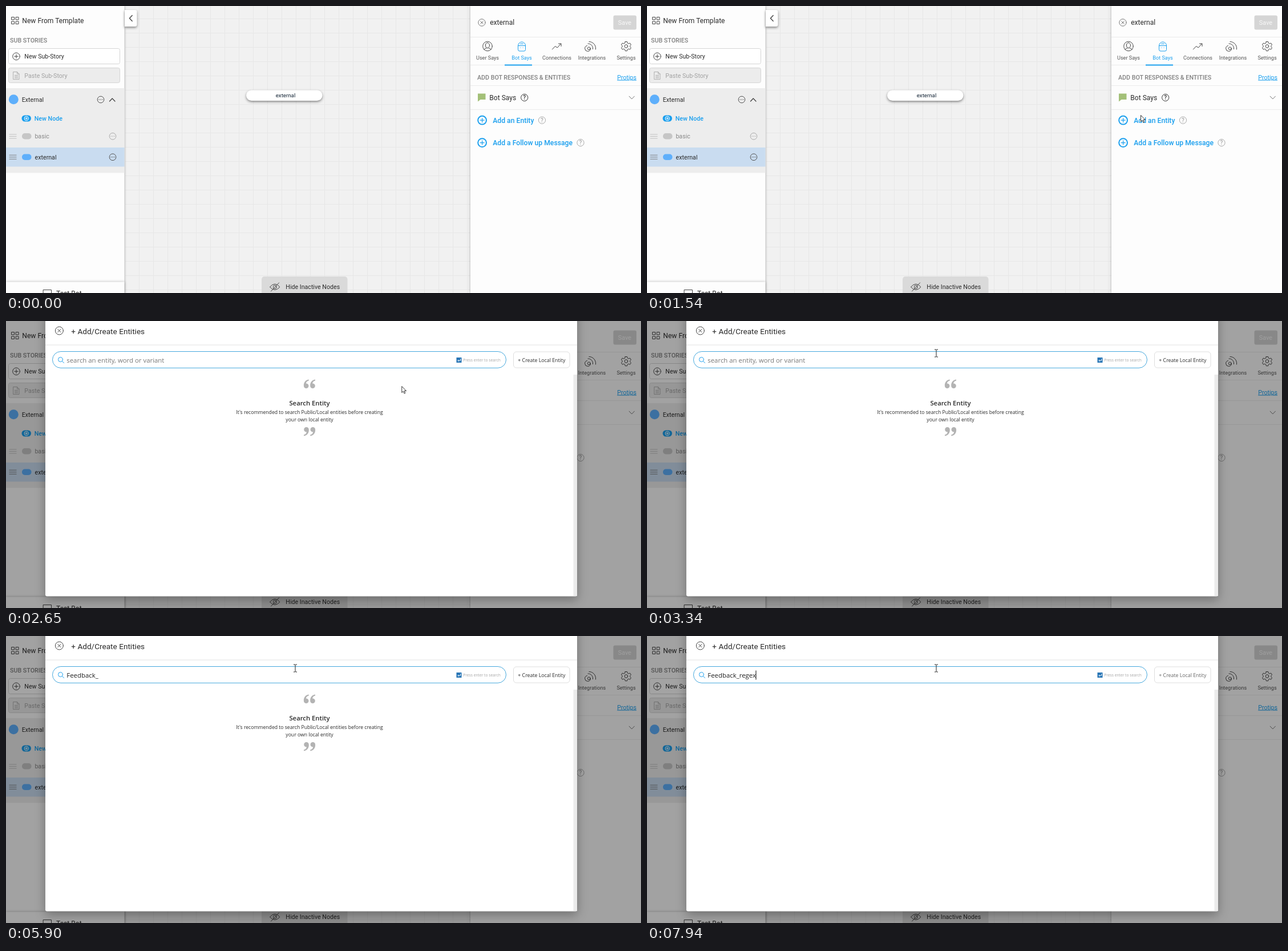
Animation of 1113 by 503 pixels, one loop 8000 ms. Source, as an HTML page:

```html
<!DOCTYPE html>
<html lang="en">
<head>
<meta charset="utf-8">
<title>Entity search</title>
<style>
html, body { margin: 0; width: 100%; height: 100%; overflow: hidden; background: #f1f1f1; }
svg { display: block; }
text { font: 10.65px Roboto, sans-serif; fill: #2b2b2b; white-space: pre; }
.big { font-size: 12.1px; }
.tab { font-size: 9.1px; fill: #555; }
.head { font-size: 10.7px; font-weight: 500; fill: #808080; }
.med { font-weight: 500; }
.blue { fill: #1a9fee; }
.pale { fill: #a2a2a2; }
.mid { text-anchor: middle; }
.os { font-family: "Open Sans", sans-serif; font-size: 8.65px; }
.ln { fill: none; stroke: #444; stroke-width: 1; stroke-linecap: round; stroke-linejoin: round; }
.ln.gray { stroke: #b0b0b0; }
.ln.azure { stroke: #1a9fee; }
.panel { filter: drop-shadow(0 0 2px rgba(0,0,0,.3)); }
.lift { filter: drop-shadow(0 2px 2px rgba(0,0,0,.45)); }
.dialog { filter: drop-shadow(0 6px 9px rgba(0,0,0,.3)); }
</style>
</head>
<body>
<svg width="1113" height="503" viewBox="0 0 1113 503">
<defs>
  <pattern id="grid" x="208" y="22" width="25" height="25" patternUnits="userSpaceOnUse">
    <path d="M0 .5H25M.5 0V25" stroke="#e7e7e7" fill="none"/>
  </pattern>
  <g id="dots">
    <circle r="5.8" fill="none" stroke="currentColor"/>
    <path d="M-2.9 0h.1M0 0h.1M2.9 0h.1" stroke="currentColor" stroke-width="1.4" stroke-linecap="round"/>
  </g>
  <g id="help">
    <circle r="6.1" fill="none" stroke="currentColor"/>
    <text class="mid med" y="3.6" style="font-size:10px;fill:currentColor">?</text>
  </g>
  <g id="plus">
    <circle r="7.4" fill="none" stroke="#1a9fee" stroke-width="2"/>
    <path d="M-4 0H4M0-4V4" stroke="#1a9fee" stroke-width="1.2"/>
  </g>
  <path id="grip" d="M0-3.5H13M0 0H13M0 3.5H13" fill="none" stroke="currentColor" stroke-width=".9"/>
  <g id="quote" fill="#b3b3b3">
    <path id="mark" d="M9.2-7.5V-5.6C6.4-4.9 4.6-3 4.3-.6A4.3 4.3 0 1 1 .4 3.5C0-2.200 3.400-6.600 9.2-7.5Z"/>
    <use href="#mark" x="11.3"/>
  </g>
</defs>

<!-- Canvas -->
<rect width="1113" height="503" fill="#f1f1f1"/>
<rect x="208" width="606" height="503" fill="url(#grid)"/>
<rect class="lift" x="421" y="147.500" width="133.500" height="18.500" rx="9.250" fill="#fff"/>
<text class="mid" x="490" y="160.300" style="font-size:9.700px;fill:#123">external</text>
<path d="M448 503V479a5 5 0 0 1 5-5H593.500a5 5 0 0 1 5 5V503Z" fill="#dadada"/>
<g class="ln" stroke-width="1.200">
  <path d="M462.500 492.500q8.700-10.500 17.500 0q-8.800 10-17.500 0M464.500 500L478.500 485"/>
  <circle cx="471.300" cy="492.500" r="3"/>
</g>
<text x="490.300" y="496.300">Hide Inactive Nodes</text>

<!-- Sidebar -->
<rect class="panel" width="207.500" height="503" fill="#fdfdfd"/>
<g class="lift">
  <path d="M208 7H226a3.500 3.500 0 0 1 3.500 3.500V32.500a3.500 3.500 0 0 1-3.500 3.500H208Z" fill="#fff"/>
</g>
<path class="ln" d="M221.200 16.500L216.500 21.500L221.200 26.500" style="stroke-width:1.400"/>
<path class="ln" d="M10 19.500h4.500v4.500h-4.500zM17.500 19.500h4.500v4.500h-4.500zM10 27h4.500v4.500h-4.500zM17.500 27h4.500v4.500h-4.500z"/>
<text class="big" x="28.300" y="30">New From Template</text>
<text class="head" x="7" y="64.200">SUB STORIES</text>
<rect x="4.500" y="74.500" width="195" height="27" rx="3" fill="#fff" stroke="#d5d5d5"/>
<circle class="ln" cx="18" cy="88.300" r="6.300"/>
<path class="ln" d="M14.800 88.300h6.400M18 85.100v6.400"/>
<text x="32.300" y="92.200">New Sub-Story</text>
<rect x="4.500" y="108.500" width="195" height="26" rx="3" fill="#ececec" stroke="#d5d5d5"/>
<path class="ln gray" d="M13 115.500h6.500l3.500 3.500v9.500h-10zM19.500 115.500v3.500h3.500M15.300 121.500h5.400M15.300 123.800h5.400M15.300 126h5.400"/>
<text class="pale" x="32.300" y="125.500">Paste Sub-Story</text>
<rect y="144" width="207.500" height="148.500" fill="#ededed"/>
<rect y="248" width="207.500" height="33.500" fill="#c9dcf0"/>
<circle cx="13.300" cy="163.800" r="8.500" fill="#5eaffb"/>
<text x="27.800" y="167.800">External</text>
<use href="#dots" x="166" y="164" color="#555"/>
<path class="ln" d="M181.500 167L186.200 162L191 167" style="stroke-width:1.300"/>
<rect x="27.500" y="191.500" width="16.500" height="11" rx="5.500" fill="#1a9fee"/>
<circle cx="35.700" cy="197" r="3.700" fill="none" stroke="#fff"/>
<path d="M33.500 197h4.400M35.700 194.800v4.400" stroke="#fff"/>
<text class="med blue" x="49.800" y="200.800">New Node</text>
<use href="#grip" x="5.500" y="228.500" color="#bbb"/>
<rect x="28" y="223" width="16.500" height="10.500" rx="5" fill="#c6c6c6"/>
<text x="50.400" y="232.200" style="fill:#888">basic</text>
<use href="#dots" x="187" y="228.300" color="#aaa"/>
<use href="#grip" x="5.500" y="264.800" color="#777"/>
<rect x="28" y="259.500" width="16.500" height="10.500" rx="5" fill="#5eaffb"/>
<text x="50.600" y="268.500">external</text>
<use href="#dots" x="187" y="264.800" color="#555"/>
<rect class="panel" y="483.500" width="207.500" height="30" fill="#fdfdfd"/>
<rect class="ln" x="65.500" y="497.500" width="14" height="12"/>
<text class="big" x="88" y="507.800">Test Bot</text>

<!-- Right panel -->
<rect class="panel" x="814" width="310" height="503" fill="#fdfdfd"/>
<circle class="ln" cx="834" cy="29" r="6.200" style="stroke:#777"/>
<path class="ln" d="M831.700 26.700l4.600 4.600M836.300 26.700l-4.600 4.600" style="stroke:#777"/>
<text class="big" x="848.200" y="33.300">external</text>
<rect x="1064.500" y="16.500" width="40.500" height="25" rx="3" fill="#d5d5d5"/>
<text class="mid" x="1084.500" y="33" style="font-size:10.900px;fill:#f8f8f8">Save</text>
<path d="M814 54.500H1113M814 103.500H1113M814 139.500H1113M814 181.500H1113" stroke="#ebebeb"/>
<rect x="874" y="102.500" width="48" height="2" fill="#1a9fee"/>
<g class="ln">
  <circle cx="844" cy="70.500" r="8.300"/>
  <ellipse cx="844" cy="69" rx="3.500" ry="4.600"/>
  <path d="M838 76.300q1-2 4-2.600M850 76.300q-1-2-4-2.600M957.500 76l5-5.500l4 2.500l6-7M968.500 66h4.500v4.500"/>
  <path d="M1018.500 69.500a5 5 0 1 0 6 6M1020 66a8 8 0 0 1 8.500 9.500M1022 62.500a11.500 11.500 0 0 1 11.500 13.500"/>
  <circle cx="1021.800" cy="74.300" r="2.400"/>
  <circle cx="1087" cy="70.500" r="2.800"/>
  <path d="M1085.300 62.500h3.400l.6 2.500l2 1l2.300-1l2 3l-1.800 1.700v1.800l1.800 1.700l-2 3l-2.300-1l-2 1l-.6 2.500h-3.400l-.6-2.500l-2-1l-2.300 1l-2-3l1.800-1.700v-1.800l-1.800-1.700l2-3l2.300 1l2-1z"/>
</g>
<path class="ln azure" d="M897.500 69.500a6.500 6.500 0 0 1 13 0v7q0 2.500-2.500 2.500h-8q-2.500 0-2.500-2.500zM897.500 69.500h13M902 73h.1M906 73h.1M901.500 66.300h5"/>
<g class="mid">
  <text class="tab" x="844" y="94.200">User Says</text>
  <text class="tab blue" x="904" y="94.200" style="fill:#1a9fee">Bot Says</text>
  <text class="tab" x="965.500" y="94.200">Connections</text>
  <text class="tab" x="1027" y="94.200">Integrations</text>
  <text class="tab" x="1087" y="94.200">Settings</text>
</g>
<text class="head" x="826" y="128.800">ADD BOT RESPONSES &amp; ENTITIES</text>
<text class="blue" x="1071.200" y="128.500" text-decoration="underline">Protips</text>
<path d="M827 153.500h13.500v10.500h-9l-4.500 3.500z" fill="#a3c078"/>
<text class="big" x="847.300" y="165">Bot Says</text>
<use href="#help" x="908.700" y="160.500" color="#333"/>
<path class="ln" d="M1092.200 158.200L1096.800 163L1101.400 158.200" style="stroke:#777"/>
<use href="#plus" x="834.600" y="200.200"/>
<text class="med blue" x="853.200" y="204.800" style="font-size:12.200px">Add an Entity</text>
<use href="#help" x="939.500" y="200.200" color="#a8a8a8"/>
<use href="#plus" x="834.600" y="239.600"/>
<text class="med blue" x="853.200" y="244.200" style="font-size:12.200px">Add a Follow up Message</text>
<use href="#help" x="1007" y="239.600" color="#a8a8a8"/>

<!-- Dialog -->
<g id="modal" visibility="hidden">
  <rect width="1113" height="503" fill="#000" opacity=".36"/>
  <rect class="dialog" x="69" y="-20" width="932" height="502.500" rx="3" fill="#fff"/>
  <path d="M69 42H1001" stroke="#e2e2e2"/>
  <rect x="994.500" y="94" width="6.500" height="388" fill="#ebebeb"/>
  <circle class="ln" cx="93.400" cy="17" r="7"/>
  <path class="ln" d="M90.800 14.400l5.200 5.200M96 14.400l-5.200 5.200"/>
  <text x="114.300" y="23" style="font-size:13.600px">+ Add/Create Entities</text>
  <rect x="81.500" y="53.500" width="795" height="28.800" rx="14.400" fill="#fff" stroke="#45a8dd"/>
  <circle class="ln azure" cx="95.500" cy="67.500" r="4"/>
  <path class="ln azure" d="M98.500 70.500l3 3"/>
  <text id="field" class="os" x="106.300" y="72.800" style="font-size:11.400px"></text>
  <rect id="caret" y="60.500" width="1" height="16" fill="#000"/>
  <rect x="789.500" y="64" width="9" height="9" fill="#2674b5"/>
  <path d="M796.500 66v3.500h-4.500M793.500 68l-1.700 1.500l1.700 1.500" fill="none" stroke="#fff" stroke-width=".9"/>
  <text class="os" x="801.200" y="71" style="font-size:6.700px;fill:#a5a5a5">Press enter to search</text>
  <rect x="889.500" y="54" width="98.500" height="28" rx="5" fill="#fff" stroke="#dedede"/>
  <text id="create" class="os" x="897.300" y="71.700" style="font-size:8.800px">+ Create Local Entity</text>
  <g id="hint">
    <use href="#quote" transform="translate(521.500 110)"/>
    <text class="os mid" x="532" y="147.800" style="font-size:11.300px;font-weight:600">Search Entity</text>
    <text class="os mid" x="532" y="162.800">It's recommended to search Public/Local entities before creating</text>
    <text class="os mid" x="532" y="176">your own local entity</text>
    <use href="#quote" transform="translate(542.500 194) rotate(180)"/>
  </g>
</g>

<g id="arrow" visibility="hidden">
  <path d="M.5.5V11.500l2.500-2.300l1.800 3.900l1.800-.8l-1.800-3.800h3.500z" fill="#fff" stroke="#222" stroke-width=".9"/>
</g>
<path id="beam" visibility="hidden" d="M-3-6.500h2.300l.7.700l.7-.7h2.300M0-5.800v11.600M-3 6.500h2.300l.7-.7l.7.700h2.300" fill="none" stroke="#222"/>
</svg>
<script>
const LOOP = 8000, BLINK = 530, OPEN = 1780, DONE = 7940;
const word = "Feedback_regex";
const keyTimes = [3960, 4150, 4310, 4480, 4660, 4810, 4930, 5050, 5370, 6130, 6360, 7010, 7130, 7600];
// Pointer path: time, x, y; sampled in steps like a screen capture
const path = [
  [300, 990, 441], [820, 908, 285], [1035, 849, 203], [1140, 865, 191],
  [2033, 865, 191], [2160, 853, 180], [2670, 640, 92], [3180, 502, 52], [3340, 507, 56.5]
];
const $ = id => document.getElementById(id);
const show = (el, on) => el.setAttribute("visibility", on ? "visible" : "hidden");
const start = performance.now();

function quantise(t) {
  if (t < 2160) return 300 + Math.floor((Math.min(t, 1140) - 300) / 105) * 105;
  if (t < 3340) return 2160 + Math.floor((Math.min(t, 3180) - 2160) / 127.5) * 127.5;
  return 3340;
}

function pointerAt(t) {
  const s = quantise(t);
  const i = Math.max(1, path.findIndex(p => p[0] >= s));
  const [t0, x0, y0] = path[i - 1], [t1, x1, y1] = path[i];
  const k = (s - t0) / (t1 - t0);
  return [x0 + (x1 - x0) * k, y0 + (y1 - y0) * k];
}

function drawField(t) {
  const count = keyTimes.filter(k => k <= t).length;
  const field = $("field");
  field.textContent = count ? word.slice(0, count) : "search an entity, word or variant";
  field.style.fill = count ? "#222" : "#777";
  const since = t - (count ? keyTimes[count - 1] : 1600);
  const open = t >= OPEN;
  show($("caret"), open && Math.floor(since / BLINK) % 2 === 0);
  $("caret").setAttribute("x", 106 + (count ? Math.round(field.getComputedTextLength()) - .5 : 0));
}

function draw() {
  const t = (performance.now() - start) % LOOP;
  const open = t >= OPEN, moving = t >= 300;
  show($("modal"), open);
  drawField(t);
  $("hint").style.display = t < DONE ? "" : "none";
  $("create").style.fill = t < DONE ? "#2b2b2b" : "#666";

  const [x, y] = moving ? pointerAt(t) : [0, 0];
  const overField = open && y > 51 && y < 83;
  const place = `translate(${x} ${y})`;
  $("arrow").setAttribute("transform", place);
  $("beam").setAttribute("transform", place);
  show($("arrow"), moving && !overField);
  show($("beam"), moving && overField);
  requestAnimationFrame(draw);
}
draw();
</script>
</body>
</html>
```
